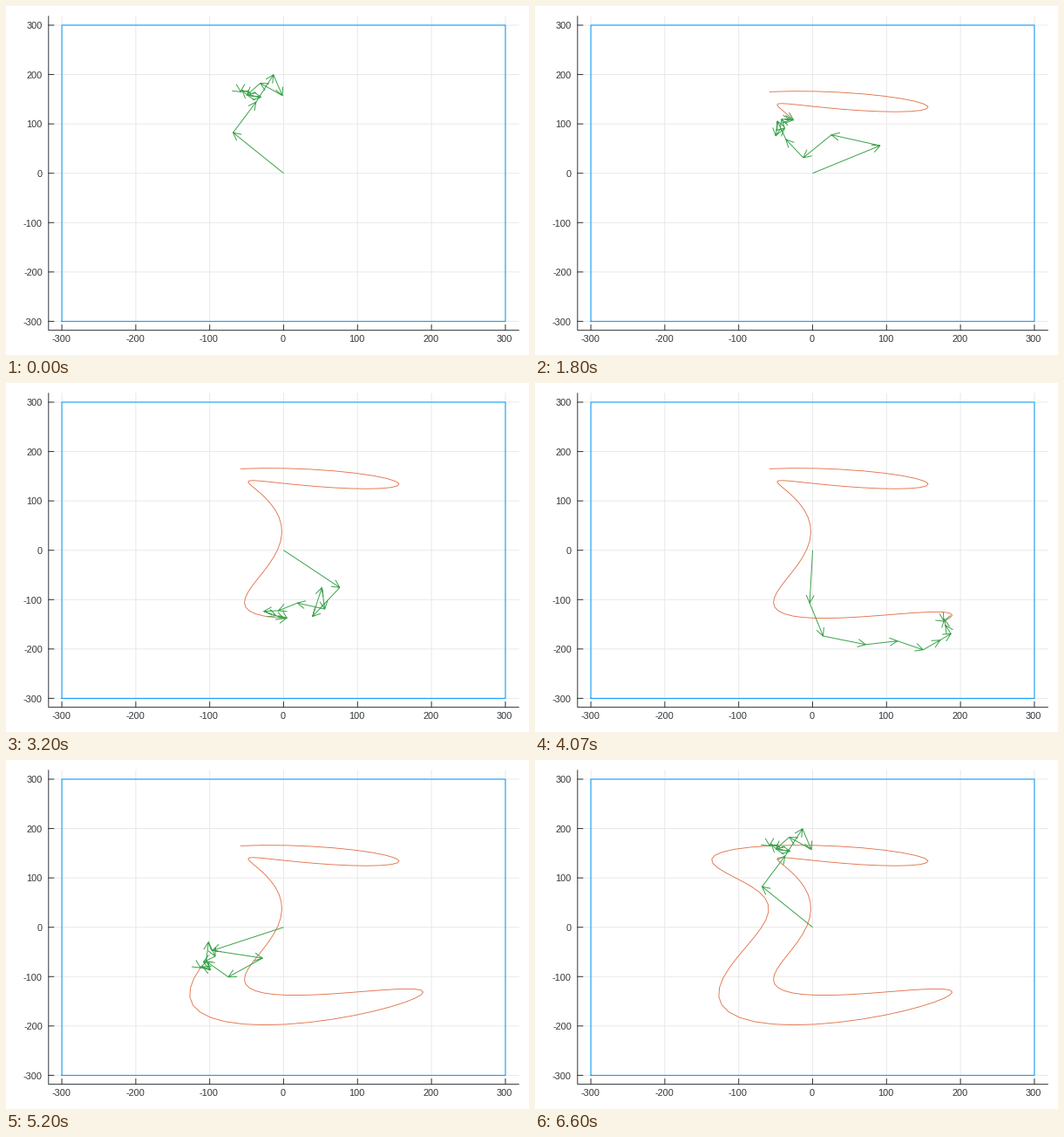
Animation, 600 px wide and 400 px high, one loop 6670 ms. Source, as a matplotlib script:

```python
import numpy as np
import matplotlib.pyplot as plt
from matplotlib.animation import FuncAnimation

W, H, DPI = 600, 400, 100
STEPS, STEP_MS = 100, 200 / 3
FRAMES, INTERVAL = 290, 23  # 6670 ms per loop
PX = 72 / DPI  # one pixel in points

BLUE, ORANGE, GREEN = "#009af9", "#e26f46", "#3da44d"
GRID, INK = "#e9e9e9", "#33373a"

# plot area in pixels and its data scale
LEFT, RIGHT, TOP, BOTTOM = 48.8, 588.2, 11.8, 371.6
SPAN = 636
X0, Y0 = (LEFT + RIGHT) / 2, (TOP + BOTTOM) / 2
SX, SY = (RIGHT - LEFT) / SPAN, (BOTTOM - TOP) / SPAN

# rotating vectors: frequency, length, start angle in degrees
TERMS = [
    (-1, 107.0, 129.7), (1, 69.3, 63.4), (-2, 60.0, 66.9), (2, 43.7, -74.0),
    (-4, 39.0, 140.0), (4, 30.0, -127.0), (-3, 19.7, -13.0), (3, 18.8, 168.0),
    (-5, 12.1, 125.0), (5, 3.7, 224.0), (0, 0.6, -44.0),
]
FREQ, LENGTH, PHASE = (np.array(col) for col in zip(*TERMS))
HEAD_BACK, HEAD_SIDE = 9.0, 4.5


def to_px(z):
    """Complex data value to complex pixel position (y down)."""
    return X0 + SX * np.real(z) + 1j * (Y0 - SY * np.imag(z))


def chain(k):
    """Joints of the vector chain at step k, in pixels."""
    turn = 2 * np.pi * k / (STEPS - 1)
    vectors = LENGTH * np.exp(1j * (FREQ * turn + np.radians(PHASE)))
    return to_px(np.concatenate([[0], np.cumsum(vectors)]))


def arrow_path(joints):
    """All shafts and open heads as one broken line."""
    a, b = joints[:-1], joints[1:]
    back = (a - b) / np.abs(a - b)
    wing1 = b + back * (HEAD_BACK + 1j * HEAD_SIDE)
    wing2 = b + back * (HEAD_BACK - 1j * HEAD_SIDE)
    gap = np.full(len(a), np.nan + 0j)
    return np.column_stack([a, b, gap, wing1, b, wing2, gap]).ravel()


fig = plt.figure(figsize=(W / DPI, H / DPI), dpi=DPI, facecolor="white")
ax = fig.add_axes([0, 0, 1, 1])
ax.set_xlim(0, W)
ax.set_ylim(H, 0)
ax.axis("off")


def line(xs, ys, color, width=1.0, **kw):
    return ax.plot(xs, ys, color=color, lw=width * PX, snap=False, **kw)[0]


def label(x, y, value, ha):
    ax.text(x, y, str(value), ha=ha, va="center_baseline", color=INK,
            family="Liberation Sans", fontsize=11 * PX)


for v in range(-300, 301, 100):
    x, y = X0 + SX * v, Y0 - SY * v
    line([x, x], [TOP, BOTTOM], GRID, zorder=1)
    line([LEFT, RIGHT], [y, y], GRID, zorder=1)
    line([x, x], [BOTTOM - 6, BOTTOM], INK, zorder=2)
    line([LEFT, LEFT + 6], [y, y], INK, zorder=2)
    label(x - 0.9, 380.6, v, "center")
    label(42, y + 0.3, v, "right")
line([LEFT, LEFT, RIGHT], [TOP, BOTTOM, BOTTOM], INK, zorder=2)

corners = to_px(300 * np.array([-1 - 1j, 1 - 1j, 1 + 1j, -1 + 1j, -1 - 1j]))
line(corners.real, corners.imag, BLUE, zorder=3)

trace = np.array([chain(k)[-1] for k in range(STEPS)])
curve = line([], [], ORANGE, 0.88, zorder=4)
arrows = line([], [], GREEN, zorder=5, solid_capstyle="butt")


def draw(i):
    # the pose holds for a whole step, so take the step reached by this tick
    k = min(int((i + 1) * INTERVAL / STEP_MS), STEPS - 1)
    seen = trace[:k + 1]
    curve.set_data(seen.real, seen.imag)
    path = arrow_path(chain(k))
    arrows.set_data(path.real, path.imag)
    return curve, arrows


anim = FuncAnimation(fig, draw, frames=FRAMES, interval=INTERVAL,
                     repeat=True, repeat_delay=0, blit=False)
plt.show()
```
